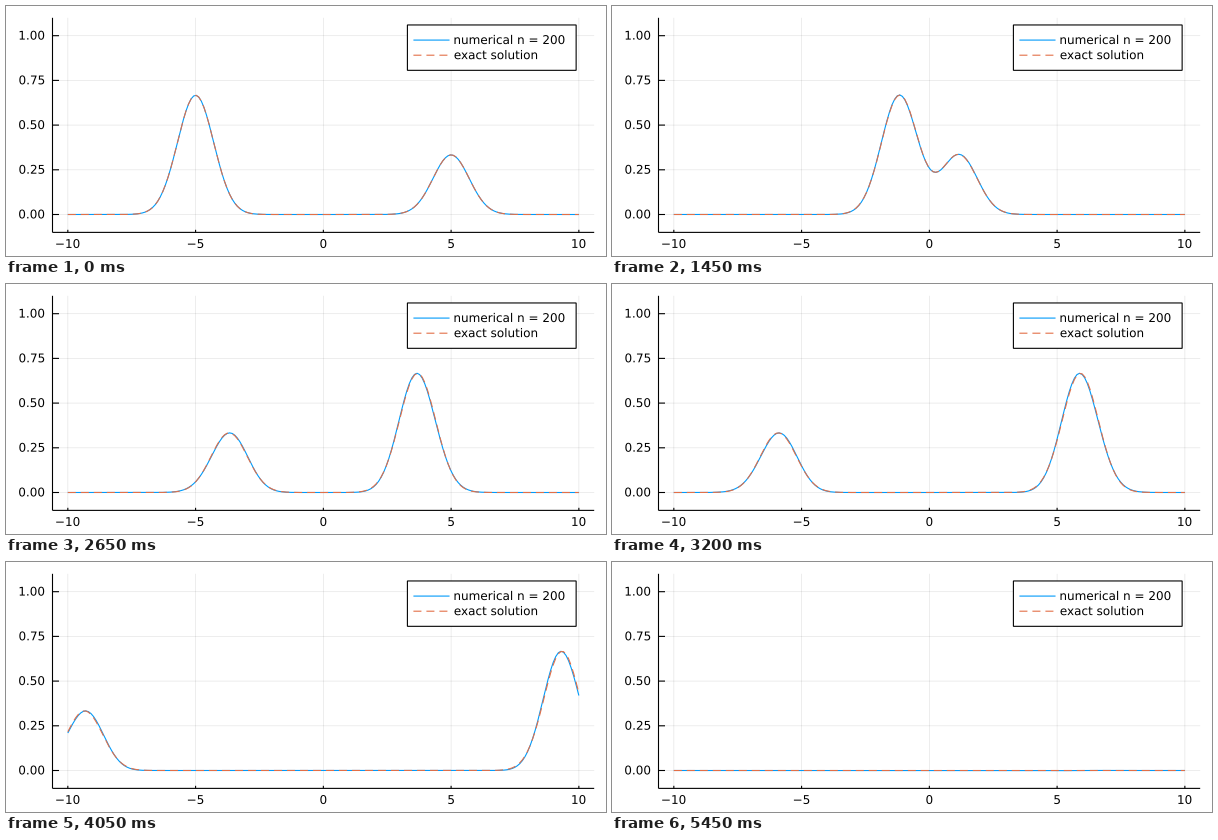
These frames come from a looping animation (600x250 px, 6 s). A matplotlib script:

```python
import matplotlib.pyplot as plt
import numpy as np
from matplotlib.animation import FuncAnimation
from matplotlib.patches import PathPatch, Rectangle
from matplotlib.textpath import TextPath
from matplotlib.transforms import Affine2D

W, H, DPI = 600, 250, 100
PX = 72 / DPI  # points per pixel
FRAME_MS, FRAMES, HOLD = 50, 120, 10
BLUE, ORANGE = "#009afa", "#e36f47"
LEFT, RIGHT, TOP, BOTTOM = 46.5, 588.19, 11.81, 226.38
LINE, FONT = 1.1, 12
DASHES = (8 / LINE, 5 / LINE)

N, STEPS, T_END, SUBSTEPS = 200, 100, 20.0, 8
x = np.linspace(-10, 10, N)
dx = x[1] - x[0]
times = np.linspace(0, T_END, STEPS)

plt.rcParams["font.family"] = "DejaVu Sans"


def pulses(t):
    """Two bumps running towards each other."""
    right = 2 / 3 * np.exp(-(x + 5 - t) ** 2)
    left = 1 / 3 * np.exp(-(x - 5 + t) ** 2)
    return right, left


def exact(t):
    return sum(pulses(t))


def rate(state):
    """Wave equation with non-reflecting ends."""
    u, v = state
    acc = np.empty(N)
    acc[1:-1] = (u[2:] - 2 * u[1:-1] + u[:-2]) / dx**2
    acc[0] = 2 * (u[1] - u[0]) / dx**2 - 2 * v[0] / dx
    acc[-1] = 2 * (u[-2] - u[-1]) / dx**2 - 2 * v[-1] / dx
    return np.array([v, acc])


def solve():
    right, left = pulses(0)
    state = np.array([right + left, 2 * (x + 5) * right - 2 * (x - 5) * left])
    dt = (times[1] - times[0]) / SUBSTEPS
    history = [state[0]]
    for _ in times[1:]:
        for _ in range(SUBSTEPS):
            k1 = rate(state)
            k2 = rate(state + dt / 2 * k1)
            k3 = rate(state + dt / 2 * k2)
            k4 = rate(state + dt * k3)
            state = state + dt / 6 * (k1 + 2 * k2 + 2 * k3 + k4)
        history.append(state[0])
    return history


def to_x(v):
    return LEFT + (v + 10.6) / 21.2 * (RIGHT - LEFT)


def to_y(v):
    return BOTTOM - (v + 0.1) / 1.2 * (BOTTOM - TOP)


fig = plt.figure(figsize=(W / DPI, H / DPI), dpi=DPI, facecolor="white")
ax = fig.add_axes([0, 0, 1, 1])
ax.set(xlim=(0, W), ylim=(H, 0))
ax.axis("off")


def line(xs, ys, color="black", width=LINE, **kw):
    return ax.plot(xs, ys, color=color, lw=width * PX, snap=False,
                   solid_capstyle="butt", dash_capstyle="butt", **kw)[0]


def grid(xs, ys):
    line(xs, ys, width=0.7, alpha=0.1)


def label(px, baseline, text, align):
    """Text outlines; align is 0 for left, 0.5 for centre, 1 for right."""
    path = TextPath((0, 0), text, size=FONT)
    box = path.get_extents()
    shift = px - box.x0 - align * box.width
    place = Affine2D().scale(1, -1).translate(shift, baseline)
    ax.add_patch(PathPatch(place.transform_path(path), fc="black", lw=0,
                           snap=False, zorder=6))


def draw_axes():
    tick_w, tick_h = 0.012 * (RIGHT - LEFT), 0.012 * (BOTTOM - TOP)
    for v in (-10, -5, 0, 5, 10):
        px = to_x(v)
        grid([px, px], [TOP, BOTTOM])
        line([px, px], [BOTTOM, BOTTOM - tick_h])
        label(px, 241.9, str(v).replace("-", "\u2212"), 0.5)
    for v in (0, 0.25, 0.5, 0.75, 1):
        py = to_y(v)
        grid([LEFT, RIGHT], [py, py])
        line([LEFT, LEFT + tick_w], [py, py])
        label(38.2, py + 3.9, f"{v:.2f}", 1)
    line([LEFT, RIGHT], [BOTTOM, BOTTOM])
    line([LEFT, LEFT], [TOP, BOTTOM])


def draw_legend():
    span, row = RIGHT - LEFT, 15.12
    x0, x1 = 401.4, RIGHT - span / 30
    y0 = TOP + (BOTTOM - TOP) / 30
    ax.add_patch(Rectangle((x0, y0), x1 - x0, 3 * row, fc="white", ec="black",
                           lw=LINE * PX, snap=False, zorder=5))
    start = x0 + span / 90
    sample = [start, start + span / 15]
    line(sample, [y0 + row] * 2, BLUE, zorder=6)
    line(sample, [y0 + 2 * row] * 2, ORANGE, dashes=DASHES, zorder=6)
    label(448.5, y0 + row + 3.9, "numerical n = 200", 0)
    label(448.5, y0 + 2 * row + 3.9, "exact solution", 0)


draw_axes()
draw_legend()
numeric = solve()
blue = line(to_x(x), to_y(numeric[0]), BLUE, zorder=3)
orange = line(to_x(x), to_y(exact(0)), ORANGE, dashes=DASHES, zorder=4)


def update(frame):
    i = min(max(frame - HOLD, 0), STEPS - 1)
    blue.set_ydata(to_y(numeric[i]))
    orange.set_ydata(to_y(exact(times[i])))
    return blue, orange


anim = FuncAnimation(fig, update, frames=FRAMES, interval=FRAME_MS,
                     repeat=True, repeat_delay=0)
plt.show()
```
